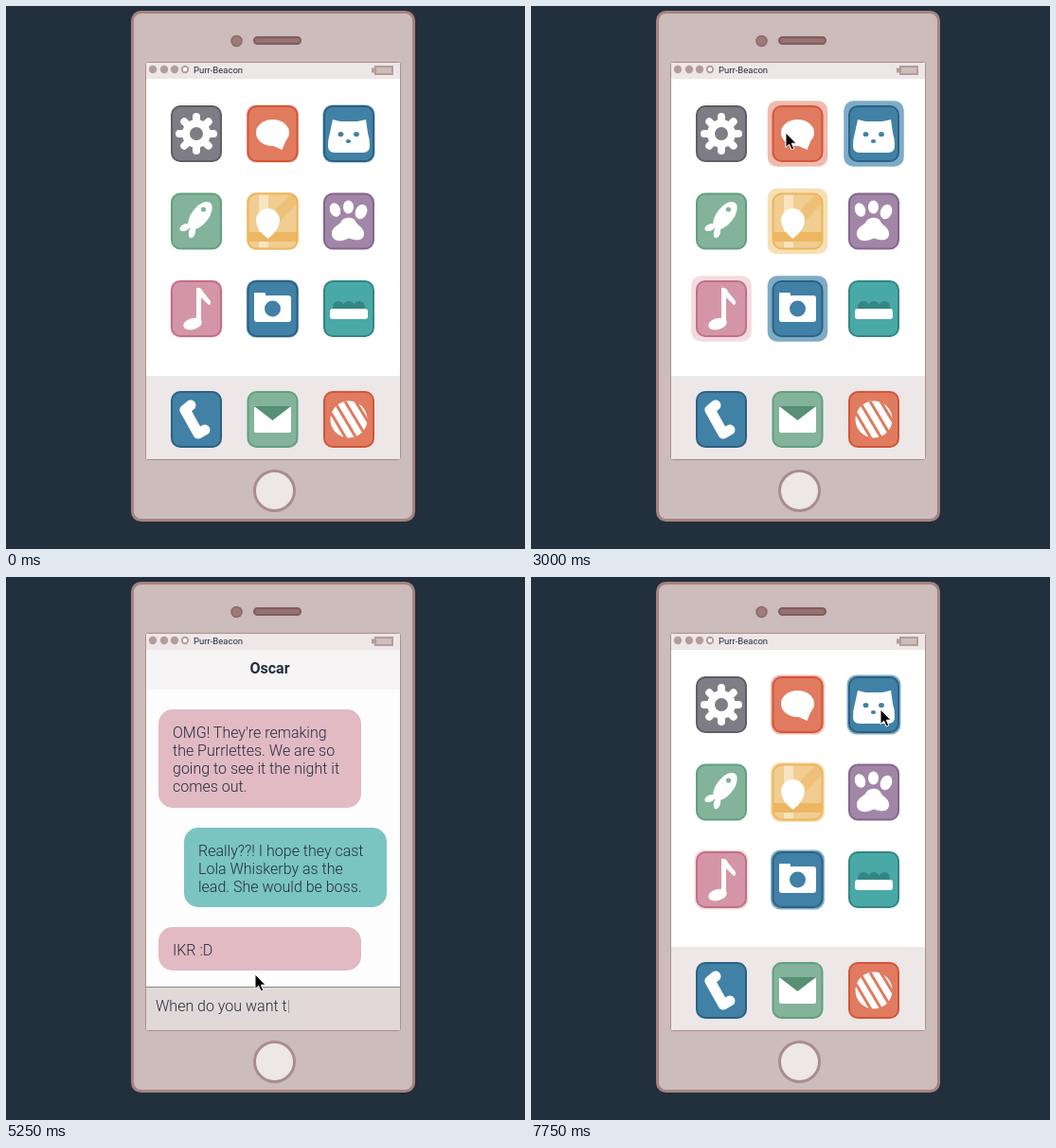
Animation of 548x574 px, one loop 8 s. Source, as an HTML page:

```html
<!DOCTYPE html>
<html lang="en">
<head>
<meta charset="utf-8">
<title>Cat phone</title>
<style>
  html, body { margin: 0; width: 100%; height: 100%; overflow: hidden; background: #222f3d; }
  svg { display: block; }
  text { font: 300 16px Roboto, sans-serif; fill: #262c3c; white-space: pre; }
  .carrier { font-size: 9.5px; font-weight: 400; }
  .title { font-weight: 700; text-anchor: middle; fill: #222f3d; }
</style>
</head>
<body>
<svg width="548" height="574" viewBox="0 0 548 574">
  <defs>
    <clipPath id="screen"><rect x="148" y="77" width="268" height="402"/></clipPath>
    <clipPath id="tile"><rect x="-26" y="-29" width="52" height="58" rx="9"/></clipPath>
    <clipPath id="ball"><circle r="20"/></clipPath>
  </defs>

  <rect x="133.5" y="6.5" width="297" height="537" rx="9" fill="#ccbcbb" stroke="#a58380" stroke-width="3"/>
  <circle cx="243.5" cy="37" r="5.5" fill="#9d7b79" stroke="#8d6a69" stroke-width="1.5"/>
  <rect x="262" y="33" width="49" height="7" rx="3.5" fill="#957271" stroke="#805d5d" stroke-width="2"/>
  <circle cx="283.5" cy="512.5" r="21" fill="#ede7e7" stroke="#a98d8d" stroke-width="3"/>
  <rect x="147.5" y="59.5" width="269" height="420" rx="2" fill="#fff" stroke="#a98e8c"/>

  <rect x="148" y="60" width="268" height="17" fill="#ede7e7"/>
  <g fill="#b59c9a">
    <circle cx="155" cy="67" r="4.2"/><circle cx="167" cy="67" r="4.2"/><circle cx="178" cy="67" r="4.2"/>
    <circle cx="189" cy="67" r="3.2" fill="#fff" stroke="#b59c9a" stroke-width="2"/>
    <rect x="386" y="65.5" width="4" height="5"/>
    <rect x="390" y="64" width="18" height="8" fill="#cdbdbb" stroke="#b59c9a" stroke-width="2"/>
  </g>
  <text class="carrier" x="198" y="71">Purr-Beacon</text>

  <g clip-path="url(#screen)">
    <rect x="148" y="391" width="268" height="88" fill="#ede7e7"/>
    <g id="icons"></g>
    <g id="chat">
      <rect x="148" y="77" width="268" height="402" fill="#fdfdfd"/>
      <rect x="148" y="77" width="268" height="42" fill="#f6f4f4"/>
      <text class="title" x="278.5" y="102">Oscar</text>
      <g id="bubbles"></g>
      <rect x="148" y="433" width="268" height="46" fill="#e1d9d8"/>
      <rect x="148" y="433" width="268" height="1" fill="#8b8382"/>
      <text x="158" y="459"><tspan id="typed"></tspan><tspan fill="#8d8a90">|</tspan></text>
    </g>
  </g>

  <path id="cursor" d="M0 0V15.5L3.6 12.2L6.2 18L8.8 16.9L6.3 11.2H11Z" fill="#000" stroke="#fff"/>
</svg>

<script>
const $ = id => document.getElementById(id);
const ellipse = (x, y, rx, ry, turn = 0, fill = '#fff') =>
  `<ellipse rx="${rx}" ry="${ry}" fill="${fill}" transform="translate(${x} ${y}) rotate(${turn})"/>`;
const path = (d, fill = '#fff') => `<path d="${d}" fill="${fill}"/>`;
const line = (d, color, width, cap = 'round') =>
  `<path d="${d}" fill="none" stroke="${color}" stroke-width="${width}" stroke-linecap="${cap}" stroke-linejoin="round"/>`;

// fill, border, pulse ring
const gray = ['#7e7c85', '#5f5d65'];
const orange = ['#e07b5f', '#d35638', '#f0bbad'];
const blue = ['#4181a6', '#2d6083', '#7eacc6'];
const green = ['#83b39a', '#60a080'];
const yellow = ['#f1cd91', '#ecb55e', '#f6dfb4'];
const purple = ['#a286a7', '#84668d'];
const pink = ['#d595a8', '#c16f88', '#f3dbe2'];
const teal = ['#49a9a7', '#358583'];

const gear = [0, 45, 90, 135].map(a =>
  `<g transform="rotate(${a})">${line('M0 -18V18', '#fff', 8)}</g>`).join('') +
  ellipse(0, 0, 15, 15) + ellipse(0, 0, 7, 7, 0, gray[0]);

const speech = ellipse(0, -1, 17.5, 14) + path('M-1 12L10 17L15 5Z');

const cat = path('M-17 -15L-9 -13H9L18 -15L20 -1Q22 5 22 13Q22 20 15 20H-15Q-22 20 -22 13Q-22 5 -20 -1Z') +
  ellipse(-8.5, .5, 2.9, 2.6, 0, blue[0]) + ellipse(8, .5, 2.9, 2.6, 0, blue[0]) +
  ellipse(-.5, 8, 2.6, 2, 0, blue[0]);

const fish = ellipse(4, -6, 17, 9, -52) + ellipse(-12, 6.5, 6, 3.5, -25) +
  ellipse(-4.5, 11.5, 3.5, 6.5, 15) + ellipse(7.5, -12.5, 2.6, 2.6, 0, green[0]);

const map = `<g clip-path="url(#tile)">` +
  line('M0 0L30 -32', '#efc178', 12, 'butt') +
  line('M-9.5 -30V30', '#f8e4c0', 10, 'butt') +
  line('M-27 16.5H27', '#edb660', 10, 'butt') + '</g>' +
  path('M-5 18.5Q-17.5 9 -17.5 -1A12.5 12.5 0 0 1 7.5 -1Q7.5 9 -5 18.5Z');

const paw = ellipse(-14.5, -12, 5.5, 7.5, -20) + ellipse(-.5, -15, 5.5, 7) + ellipse(13, -10, 6, 8, 25) +
  path('M-18 14C-19 6 -9 4 -8 0C-5 -5 5 -5 7 0C9 5 16 6 16 13C16 21 8 21 0 18C-8 22 -17 22 -18 14Z');

const note = ellipse(-4, 16, 10, 6, -15) + path('M0 -22Q5 -23 7 -18L15 -8Q15 -2 12 -5L5 -12V15H0Z');

const camera = '<rect x="-19.5" y="-14" width="39" height="28" rx="3" fill="#fff"/>' +
  '<rect x="-19.5" y="-17" width="12" height="8" rx="1" fill="#fff"/>' + ellipse(0, 0, 8.5, 8.5, 0, blue[0]);

const bowl = [-11, 0, 11].map(x => ellipse(x, -2, 6, 6, 0, teal[1])).join('') +
  '<rect x="-20" y="0" width="40" height="11" rx="3" fill="#fff"/>';

const handset = line('M-6 -15L-12 -10L2 15L9 11', '#fff', 11);

const mail = '<rect x="-19.5" y="-14" width="39" height="28" rx="2" fill="#fff"/>' +
  path('M-19.5 -14H19.5L0 1Z', '#579074');

const yarn = ellipse(0, 0, 19.5, 19.5) + '<g clip-path="url(#ball)">' +
  line('M-19 -7L-3 20M-14 -17L8 20M-4 -19L17 16M6 -21L23 7', orange[0], 3, 'butt') + '</g>';

const columns = [201, 281.5, 362], rows = [135, 227.5, 320, 437];
const tiles = [
  [gray, gear], [orange, speech], [blue, cat],
  [green, fish], [yellow, map], [purple, paw],
  [pink, note], [blue, camera], [teal, bowl],
  [[blue[0], blue[1]], handset], [green, mail], [[orange[0], orange[1]], yarn],
];
$('icons').innerHTML = tiles.map(([[fill, border, ring], art], i) =>
  `<g transform="translate(${columns[i % 3]} ${rows[Math.floor(i / 3)]})">` +
  (ring ? `<rect class="ring" fill="${ring}"/>` : '') +
  `<rect x="-26" y="-29" width="52" height="58" rx="9" fill="${fill}"/>${art}` +
  `<rect x="-26" y="-29" width="52" height="58" rx="9" fill="none" stroke="${border}" stroke-width="2"/></g>`).join('');
const rings = document.querySelectorAll('.ring');

const bubble = (x, y, height, fill, lines) =>
  `<rect x="${x}" y="${y}" width="214" height="${height}" rx="15" fill="${fill}"/>` +
  lines.map((s, i) => `<text x="${x + 15}" y="${y + 30 + i * 19}">${s}</text>`).join('');
$('bubbles').innerHTML =
  bubble(161, 140, 104, '#e1bac4', ["OMG! They're remaking", 'the Purrlettes. We are so', 'going to see it the night it', 'comes out.']) +
  bubble(188, 265, 84, '#7ac5c1', ['Really??! I hope they cast', 'Lola Whiskerby as the', 'lead. She would be boss.']) +
  bubble(161, 370, 46, '#e1bac4', ['IKR :D']);

const LOOP = 8000, STEP = 250, SLIDE = 840;
const draft = 'When do you want to go?';
// time, x, y
const route = [
  [250, 519, 4], [1250, 276, 132], [1500, 274, 133], [3000, 269, 134], [4250, 272, 134],
  [5250, 263, 420], [6000, 276, 510], [6750, 276, 510], [7500, 366, 150], [7750, 369, 140],
];

const ease = (t, start, length) => {
  const x = Math.min(1, Math.max(0, (t - start) / length));
  return x * x * (3 - 2 * x);
};

function cursorAt(t) {
  const next = route.findIndex(p => p[0] > t);
  if (next < 0) return route[route.length - 1].slice(1);
  const [t0, x0, y0] = route[next - 1], [t1, x1, y1] = route[next];
  const k = ease(t, t0, t1 - t0);
  return [x0 + (x1 - x0) * k, y0 + (y1 - y0) * k];
}

function draw(t) {
  const grow = 3 * (1 - Math.cos((t - 400) / 4000 * 2 * Math.PI));
  for (const ring of rings) {
    const w = 27 + grow, h = 30 + grow;
    const box = { x: -w, y: -h, width: 2 * w, height: 2 * h, rx: 10 };
    for (const key in box) ring.setAttribute(key, box[key]);
  }

  const shown = ease(t, 4000, SLIDE) - ease(t, 6476, SLIDE);
  $('chat').setAttribute('transform', `translate(0 ${Math.round(402 * (1 - shown))})`);
  $('typed').textContent = draft.slice(0, Math.max(0, Math.floor((t - 4500) * 0.024)));

  const visible = t >= route[0][0];
  $('cursor').setAttribute('visibility', visible ? 'visible' : 'hidden');
  if (visible) $('cursor').setAttribute('transform', `translate(${cursorAt(t)})`);
}

const begin = performance.now();
function tick() {
  const t = (performance.now() - begin) % LOOP;
  draw(Math.floor(t / STEP) * STEP);
  requestAnimationFrame(tick);
}
tick();
</script>
</body>
</html>
```
